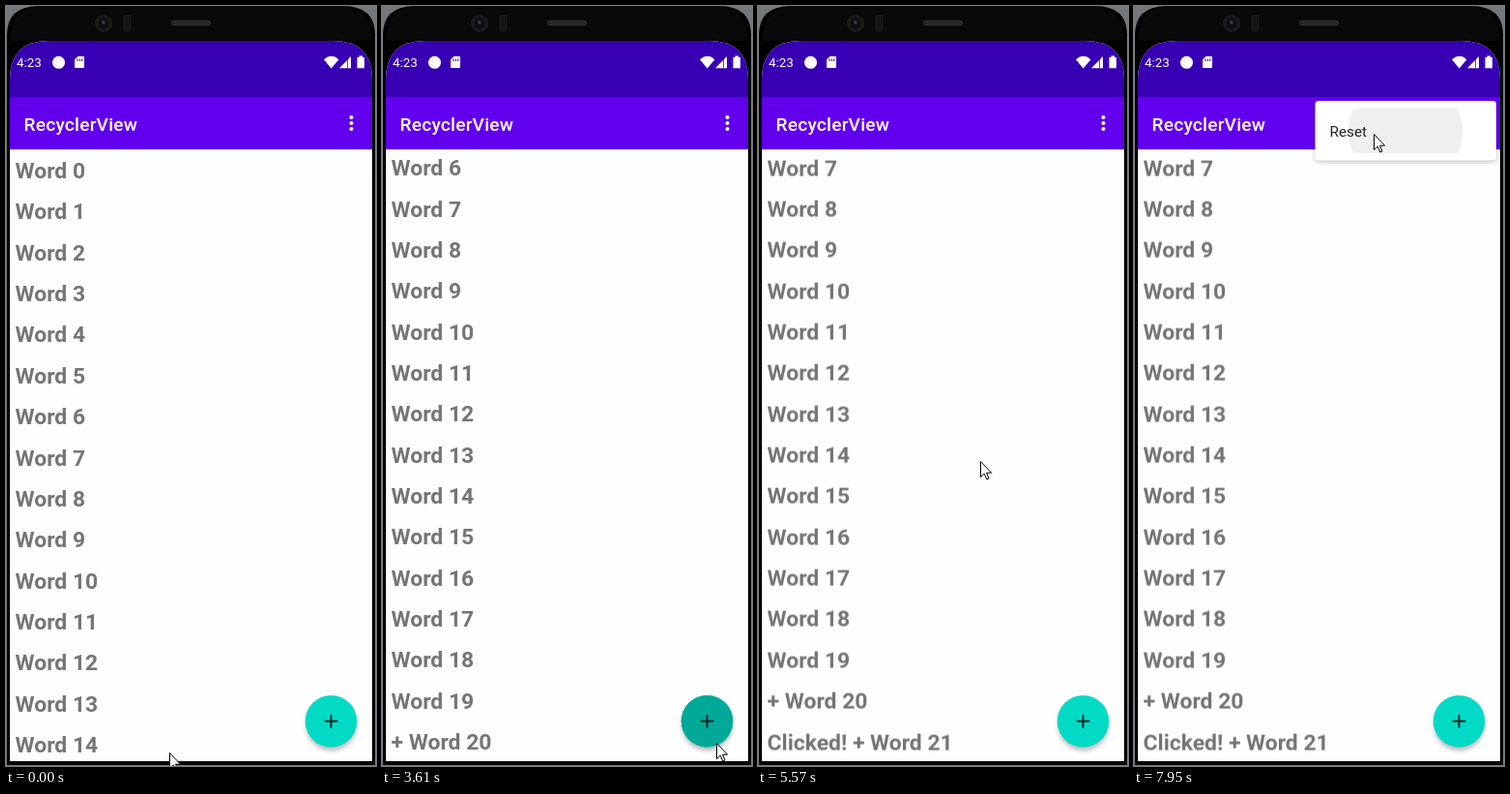
These frames come from a looping animation (383x785 px, 8 s). An HTML page:

```html
<!DOCTYPE html>
<html lang="en">
<head>
<meta charset="utf-8">
<title>RecyclerView</title>
<style>
html, body { margin: 0; width: 100%; height: 100%; overflow: hidden; background: #000; }
svg { display: block; width: 100vw; height: 100vh; font-family: Roboto, sans-serif; }
.title { font-size: 19.1px; font-weight: 500; letter-spacing: .0125em; }
.clock { font-size: 13.4px; }
.item { font-size: 15.3px; }
#rows { font-size: 22.9px; font-weight: 700; fill: #757575; }

/* One 8 s clock; every change is a hard step. */
#cursor, #rows, #press, #menu, #ripple, .before, .after {
  animation: 8s step-end -2ms infinite;
}
#cursor { animation-name: cursor; }
#rows { animation-name: scroll; }
#press { animation-name: press; opacity: 0; }
#menu { animation-name: menu; opacity: 0; }
#ripple { animation-name: ripple; opacity: 0; }
.after { opacity: 0; }
.w0.before { animation-name: hide0; }
.w0.after { animation-name: show0; }
.w5.before { animation-name: hide5; }
.w5.after { animation-name: show5; }
.w21.before { animation-name: hide21; }
.w21.after { animation-name: show21; }

@keyframes hide0 { 0% { opacity: 1 } 15.875%, 100% { opacity: 0 } }
@keyframes show0 { 0% { opacity: 0 } 15.875%, 100% { opacity: 1 } }
@keyframes hide5 { 0% { opacity: 1 } 24.625%, 100% { opacity: 0 } }
@keyframes show5 { 0% { opacity: 0 } 24.625%, 100% { opacity: 1 } }
@keyframes hide21 { 0% { opacity: 1 } 66.25%, 100% { opacity: 0 } }
@keyframes show21 { 0% { opacity: 0 } 66.25%, 100% { opacity: 1 } }

@keyframes scroll {
  0% { transform: translateY(0) }
  43.375% { transform: translateY(-130px) }
  45.125% { transform: translateY(-257px) }
  53.875% { transform: translateY(-282px) }
  55.625%, 100% { transform: translateY(-299.4px) }
}
@keyframes press {
  0% { opacity: 0 }
  41.625% { opacity: .7 }
  43.375% { opacity: 1 }
  47% { opacity: 0 }
  52.125% { opacity: .7 }
  53.875% { opacity: 1 }
  57.375%, 100% { opacity: 0 }
}
@keyframes menu {
  0% { opacity: 0 }
  83.375% { opacity: .75 }
  85.125%, 100% { opacity: 1 }
}
@keyframes ripple { 0% { opacity: 0 } 95.625%, 100% { opacity: 1 } }
@keyframes cursor {
  0% { transform: translate(169px, 771px) }
  1.875% { transform: translate(62px, 400px) }
  3.625% { transform: translate(0, 109px) }
  5.5% { transform: translate(24px, 146px) }
  7.25% { transform: translate(42px, 166px) }
  15.875% { transform: translate(49px, 219px) }
  17.625% { transform: translate(58px, 310px) }
  19.125% { transform: translate(65px, 368px) }
  24.625% { transform: translate(80px, 388px) }
  26.25% { transform: translate(140px, 452px) }
  27.875% { transform: translate(200px, 532px) }
  29.375% { transform: translate(255px, 612px) }
  31.125% { transform: translate(302px, 692px) }
  32.75% { transform: translate(328px, 746px) }
  34.375% { transform: translate(340px, 771px) }
  35.875% { transform: translate(345px, 761px) }
  37.875% { transform: translate(346px, 761px) }
  55.625% { transform: translate(325px, 768px) }
  57.375% { transform: translate(190px, 773px) }
  59.25% { transform: translate(89px, 762px) }
  66.25% { transform: translate(94px, 750px) }
  68% { transform: translate(150px, 640px) }
  69.625% { transform: translate(230px, 470px) }
  71.375% { transform: translate(312px, 270px) }
  73.125% { transform: translate(366px, 115px) }
  74.875% { transform: translate(372px, 79px) }
  76.625% { transform: translate(362px, 105px) }
  78.25% { transform: translate(358px, 116px) }
  86.875% { transform: translate(335px, 122px) }
  88.625% { transform: translate(300px, 130px) }
  90.375% { transform: translate(270px, 135px) }
  92.125% { transform: translate(253px, 134px) }
  93.875%, 100% { transform: translate(248px, 132px) }
}
</style>
</head>
<body>
<svg viewBox="0 0 383 785" preserveAspectRatio="none">
  <defs>
    <clipPath id="screen"><path d="M4 780V76Q4 36 44 36H339Q379 36 379 76V780Z"/></clipPath>
    <clipPath id="list"><rect x="4" y="148" width="375" height="632"/></clipPath>
    <clipPath id="option"><rect x="187.5" y="106" width="187.5" height="46"/></clipPath>
    <filter id="soft" x="-30%" y="-30%" width="160%" height="170%"><feGaussianBlur stdDeviation="2.4"/></filter>
  </defs>

  <!-- phone body -->
  <rect width="383" height="785" fill="#73777a"/>
  <path d="M1 784V30Q1 0 34 0H349Q382 0 382 30V784Z" fill="#000"/>
  <path d="M4 36Q5 2 36 0H347Q378 2 379 36Z" fill="#090909"/>
  <circle cx="101" cy="18" r="9" fill="#1b1b1b"/>
  <circle cx="101" cy="18" r="5.5" fill="#0c0c0e"/>
  <circle cx="101" cy="17" r="2" fill="#34383c"/>
  <rect x="121" y="9" width="9" height="18" rx="3.5" fill="#151515"/>
  <rect x="171" y="14.5" width="41" height="6" rx="3" fill="#292929"/>

  <g clip-path="url(#screen)">
    <rect x="4" y="36" width="375" height="744" fill="#fefefe"/>
    <g clip-path="url(#list)"><g id="rows"></g></g>
    <rect x="4" y="148" width="375" height="1" fill="#000" opacity=".12"/>
    <rect x="4" y="36" width="375" height="58" fill="#3700b3"/>
    <rect x="4" y="94" width="375" height="54" fill="#6200ee"/>
  </g>

  <!-- status bar and toolbar -->
  <g fill="#fff">
    <text class="clock" x="11" y="63">4:23</text>
    <circle cx="54.5" cy="58.3" r="6.5"/>
    <path d="M74.5 52H80Q81 52 81 53V63Q81 64 80 64H72Q71 64 71 63V55.5Z"/>
    <path d="M329 55.2Q337 48.5 344.5 55.2L336.7 64.5Z"/>
    <path d="M345 64.3L357 52V64.3Z"/>
    <path d="M363.5 53H365.5V51.5H369V53H371V64.3H363.5Z"/>
    <text class="title" x="18.5" y="128.5">RecyclerView</text>
    <circle cx="357.5" cy="115" r="2"/>
    <circle cx="357.5" cy="121" r="2"/>
    <circle cx="357.5" cy="127" r="2"/>
  </g>
  <path d="M74 54.5V57M76.3 54.5V57M78.6 54.5V57" stroke="#3700b3"/>
  <path d="M353.5 55V64.3" stroke="#3700b3" stroke-width=".8"/>

  <!-- add button -->
  <circle cx="336.5" cy="743" r="26" opacity=".28" filter="url(#soft)"/>
  <circle cx="336.5" cy="738.8" r="26.8" fill="#03dac5"/>
  <circle id="press" cx="336.5" cy="738.8" r="26.8" fill="#02a999"/>
  <path d="M329.8 738.8H343.2M336.5 732.1V745.5" stroke="#10201f" stroke-width="1.9"/>

  <g id="menu">
    <rect x="187.5" y="100" width="187.5" height="61" rx="4" opacity=".25" filter="url(#soft)"/>
    <rect x="187.5" y="98" width="187.5" height="61.5" rx="3.5" fill="#fff"/>
    <circle id="ripple" cx="281" cy="129" r="59" fill="#efefef" clip-path="url(#option)"/>
    <text class="item" x="202.5" y="135" fill="#212121">Reset</text>
  </g>

  <path id="cursor" d="M.5 .5V16.6L4.2 13.1L6.8 19L9 18L6.5 12.2H11.6Z"
        fill="#fff" stroke="#000" stroke-width="1"/>
</svg>
<script>
const rows = document.getElementById('rows');
const pitch = 42.36, firstBaseline = 178;

function addText(label, i, cls) {
  const el = document.createElementNS('http://www.w3.org/2000/svg', 'text');
  el.setAttribute('x', 9.6);
  el.setAttribute('y', firstBaseline + i * pitch);
  if (cls) el.setAttribute('class', `w${i} ${cls}`);
  el.textContent = label;
  rows.append(el);
}

for (let i = 0; i < 22; i++) {
  const word = (i < 20 ? '' : '+ ') + 'Word ' + i;
  const clickable = [0, 5, 21].includes(i);
  addText(word, i, clickable && 'before');
  if (clickable) addText('Clicked! ' + word, i, 'after');
}
</script>
</body>
</html>
```
